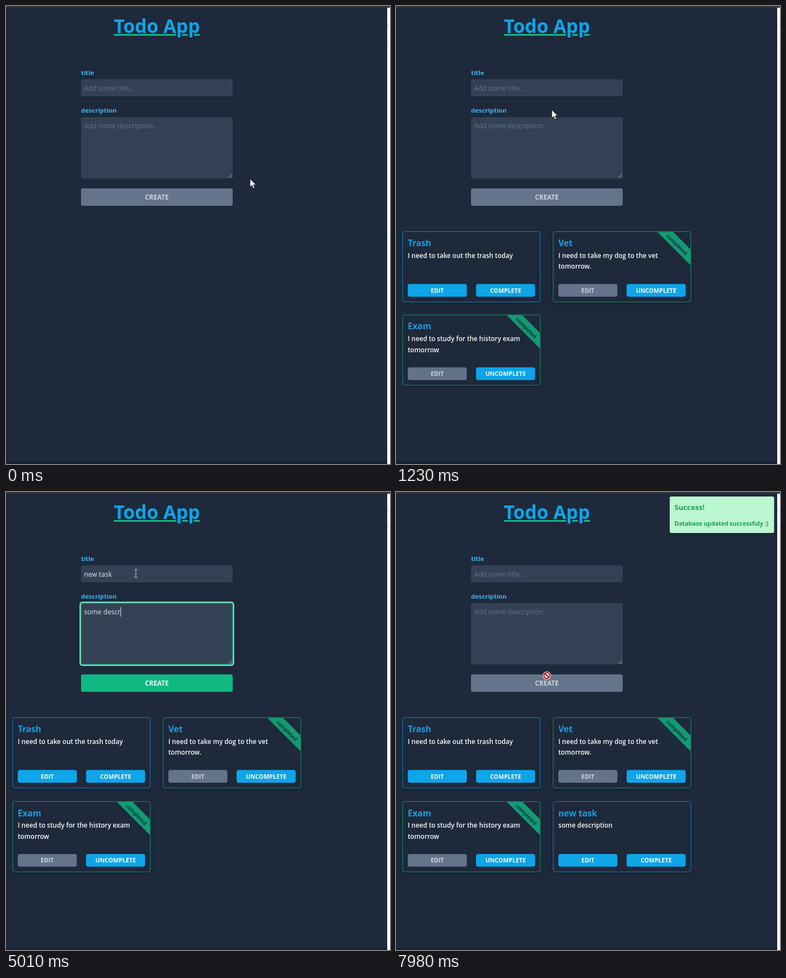
An HTML page for the animation above (8000 ms loop, 686 by 816 pixels).

```html
<!DOCTYPE html>
<html lang="en">
<head>
<meta charset="utf-8">
<title>Todo App</title>
<style>
  html, body { margin: 0; width: 100%; height: 100%; overflow: hidden; background: #1e293b; }
  body, text { font-family: "Open Sans", "Noto Sans", sans-serif; }
  h1 {
    position: absolute; left: 119px; top: 15px; width: 301px; margin: 0;
    font-size: 33.5px; line-height: 40px; font-weight: 700; text-align: center; color: #0ea5e9;
    text-decoration: underline #10b981 2.5px; text-underline-offset: 1.5px;
  }
  svg { position: absolute; left: 0; top: 0; }
  text { white-space: pre; }
  .label { font-size: 11.3px; font-weight: 700; fill: #38b6f4; }
  .field { font-size: 12.1px; }
  .create { font-size: 11.7px; font-weight: 700; text-anchor: middle; }
  .head { font-size: 15.4px; font-weight: 700; fill: #0fa0e3; }
  .body { font-size: 11.65px; font-weight: 600; fill: #f8fafc; }
  .btn { font-size: 10.6px; font-weight: 700; text-anchor: middle; }
  .tag { font-size: 9.4px; font-weight: 600; text-anchor: middle; fill: #0f1b2d; }
  .good { font-weight: 700; fill: #16a34a; }
  .ring { fill: none; }
</style>
</head>
<body>
<h1>Todo App</h1>
<svg id="stage" width="686" height="816" viewBox="0 0 686 816"></svg>
<script>
const LOOP = 8000, CLEAR = 7270;
const SKY = '#0ea5e9', GREEN = '#10b981', GREY = '#64748b', PALE = '#cbd5e1';

const rect = (x, y, w, h, fill, r = 0, more = '') =>
  `<rect x="${x}" y="${y}" width="${w}" height="${h}" rx="${r}" fill="${fill}" ${more}/>`;
const text = (x, y, cls, str, more = '') => `<text x="${x}" y="${y}" class="${cls}" ${more}>${str}</text>`;

// Shadow that falls outside its own shape only.
const defs = `<defs><filter id="shadow" x="-20%" y="-20%" width="140%" height="150%">
  <feGaussianBlur in="SourceAlpha" stdDeviation="3"/><feOffset dy="3"/>
  <feComposite operator="out" in2="SourceAlpha"/></filter></defs>`;

const button = (x, label, on) =>
  rect(x, 495.3, 105.5, 22.7, on ? SKY : GREY, 4) +
  text(x + 52.8, 510.8, 'btn', label, `fill="${on ? '#f8fafc' : PALE}"`);

// A card is drawn in the first grid cell and moved to its own cell.
function card({ head, lines, done }) {
  const ribbon = done
    ? `<path d="M198 402.5h28l31 31v28z" fill="${GREEN}" fill-opacity=".8"/>` +
      text(0, 0, 'tag', 'completed', 'transform="translate(230.3 427.4) rotate(45)"')
    : '';
  return rect(11.5, 401.5, 246.5, 126, '#000', 4, 'filter="url(#shadow)" opacity=".2"') +
    rect(11.8, 401.8, 246, 125.5, 'none', 4, `stroke="${done ? GREEN : SKY}" stroke-opacity=".75"`) +
    ribbon + text(21, 428, 'head', head) +
    lines.map((line, i) => text(21, 448.5 + i * 19.6, 'body', line)).join('') +
    button(21, 'EDIT', !done) + button(143, done ? 'UNCOMPLETE' : 'COMPLETE', true);
}

const cards = [
  { head: 'Trash', lines: ['I need to take out the trash today'], start: 525 },
  { head: 'Vet', lines: ['I need to take my dog to the vet', 'tomorrow.'], done: true, start: 630 },
  { head: 'Exam', lines: ['I need to study for the history exam', 'tomorrow'], done: true, start: 735 },
  { head: 'new task', lines: ['some description'], start: 7315 }
];

const toast = rect(489, 8, 186.5, 65, '#bbf7d0', 3) +
  text(497.5, 31.5, 'good', 'Success!', 'font-size="13.1"') +
  text(497.5, 60, 'good', 'Database updated successfuly :)', 'font-size="10.5"');

const fields = [
  { label: 'title', hint: 'Add some title...', y: 130.5, h: 30.5, from: 1530, to: 3240,
    typed: 'new task', keys: [2250, 2320, 2490, 2640, 2810, 2910, 3010, 3110] },
  { label: 'description', hint: 'Add some description...', y: 198, h: 109.3, from: 3240, to: 7230,
    typed: 'some description',
    keys: [3550, 3620, 3690, 3750, 4140, 4240, 4430, 4580, 4680, 5010, 5080, 5300, 5400, 5600, 5670, 5740] }
];

const fieldMarkup = (f, i) =>
  text(134, f.y - 8, 'label', f.label) +
  rect(134, f.y, 271, f.h, '#334155', 3) +
  `<g id="ring${i}" class="ring">` +
  rect(133.7, f.y - .3, 271.6, f.h + .6, 'none', 3, `stroke="${GREEN}" stroke-width="2"`) +
  rect(132.3, f.y - 1.7, 274.4, f.h + 3.4, 'none', 4, 'stroke="#b9f3da" stroke-width="1.5"') + '</g>' +
  text(139.5, f.y + 20, 'field', '', `id="text${i}"`) +
  rect(0, f.y + 7, 1, 17, '#f1f5f9', 0, `id="caret${i}"`);

const cursors = {
  arrow: '<path d="M0 0v14.5l3.4-3.2 2.3 5.4 2.5-1-2.3-5.3h4.7z" fill="#fff" stroke="#111" stroke-width=".7"/>',
  beam: '<path d="M-3-7h2.2L0-6.3.8-7H3M-3 7h2.2L0 6.3.8 7H3M0-6.3V6.3" fill="none" stroke="#cbd5e1"/>',
  hand: '<path d="M-1.5-1q0-1.5 1.5-1.5T1.5-1v5l7 1.5q1.5.5 1.5 2l-1 5-1.5 3H0l-5.5-7q0-2 2-1.5l2 2z" fill="#fff" stroke="#111" stroke-width=".9"/>',
  no: '<circle r="7.3" fill="#fff"/><circle r="5.3" fill="#fff" stroke="#b91c1c" stroke-width="2.2"/>' +
    '<path d="M-3.7-3.7 3.7 3.7" stroke="#7f1d1d" stroke-width="2.2"/>'
};

document.getElementById('stage').innerHTML = defs +
  rect(0, 812.5, 681, 4, '#172033') +
  fields.map(fieldMarkup).join('') +
  '<path d="M397.5 306 404 299.5M401.5 306 404 303.5" stroke="#a8b0bb"/>' +
  rect(134, 325, 271, 31, GREY, 3, 'id="create"') + text(269.5, 345.3, 'create', 'CREATE', 'id="createText"') +
  cards.map((c, i) => `<g id="card${i}">${card(c)}</g>`).join('') +
  `<g id="toast">${toast}</g>` +
  rect(681, 0, 5, 816, '#f8fafc') + rect(681, 33, 5, 1, '#cfd6de') + rect(681, 63, 5, 1, '#cfd6de') +
  rect(0, 0, 686, 3, '#343434') +
  '<g id="cursor"></g>';

const $ = id => document.getElementById(id);
const show = (el, on) => el.setAttribute('visibility', on ? 'visible' : 'hidden');

// Fade in while dropping 72px, accelerating for half a second.
function drop(el, t, start, x = 0, y = 0) {
  const u = Math.min(1, Math.max(0, (t - start) / 500)), p = u * u;
  el.setAttribute('opacity', p);
  el.setAttribute('transform', `translate(${x} ${y - 72 * (1 - p)})`);
}

function drawField(f, i, t) {
  const cleared = t >= CLEAR, past = f.keys.filter(k => k <= t);
  const str = cleared ? '' : f.typed.slice(0, past.length);
  const label = $('text' + i), focused = t >= f.from && t < f.to;
  label.textContent = str || f.hint;
  label.setAttribute('fill', str ? '#e2e8f0' : GREY);
  show($('ring' + i), focused);
  const idle = t - Math.max(f.from, ...past);
  show($('caret' + i), focused && idle % 1040 < 520);
  $('caret' + i).setAttribute('x', 139 + (str ? label.getComputedTextLength() + .5 : 0));
}

const path = [
  [0, 436, 308], [820, 436, 308], [1020, 330, 230], [1420, 232, 145],
  [6480, 232, 145], [7130, 268.5, 327], [7480, 268.5, 327], [7900, 269.5, 327], [LOOP, 269.5, 327]
];

function drawCursor(t) {
  const n = path.findIndex(p => p[0] > t), a = path[n - 1], b = path[n];
  const u = (t - a[0]) / (b[0] - a[0]);
  const x = a[1] + (b[1] - a[1]) * u, y = a[2] + (b[2] - a[2]) * u;
  const over = (top, h) => x > 134 && x < 405 && y > top && y < top + h;
  const kind = over(325, 31) ? (t < CLEAR ? 'hand' : 'no')
    : fields.some(f => over(f.y, f.h)) ? 'beam' : 'arrow';
  $('cursor').innerHTML = cursors[kind];
  $('cursor').setAttribute('transform', `translate(${x} ${y})`);
}

function draw() {
  const t = performance.now() % LOOP;
  fields.forEach((f, i) => drawField(f, i, t));
  const ready = t >= 3550 && t < CLEAR;
  $('create').setAttribute('fill', ready ? GREEN : GREY);
  $('createText').setAttribute('fill', ready ? '#f1f5f9' : PALE);
  cards.forEach((c, i) => drop($('card' + i), t, c.start, i % 2 * 269, (i >> 1) * 149.6));
  drop($('toast'), t, 7315);
  drawCursor(t);
  requestAnimationFrame(draw);
}
draw();
</script>
</body>
</html>
```
